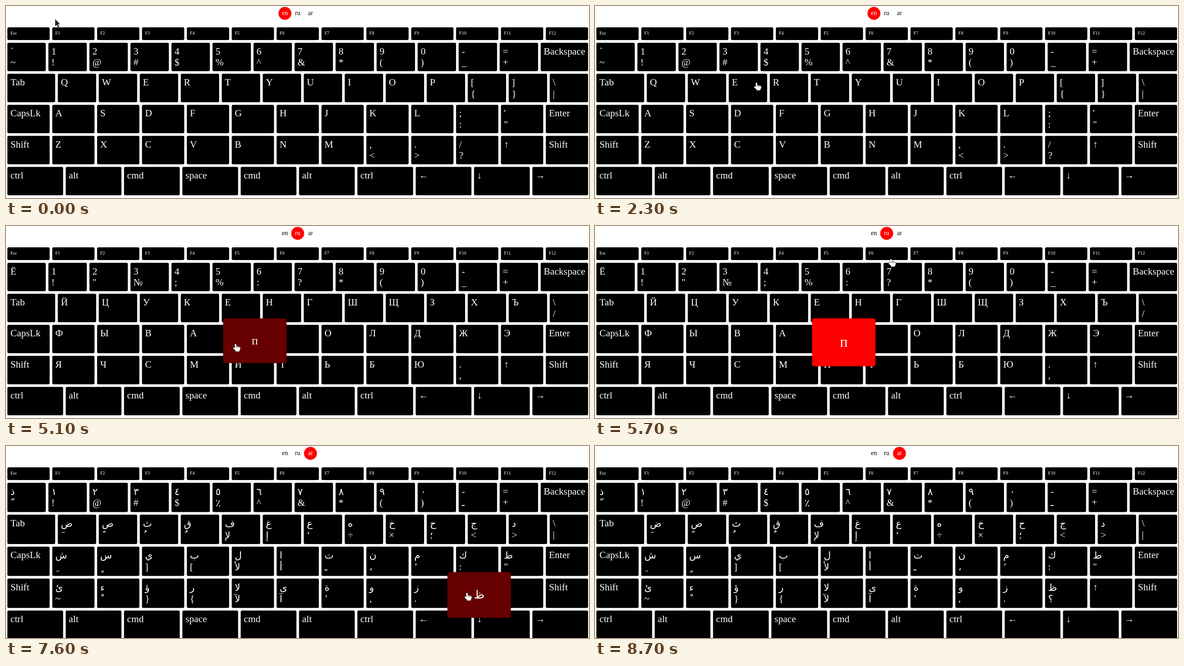
Recreate the animation shown at these times as an HTML page with a canvas. Size 1280 by 423 pixels, loop 9.4 s.

```html
<!DOCTYPE html>
<html lang="en">
<head>
<meta charset="utf-8">
<title>Keyboard layouts</title>
<style>
html, body { margin: 0; width: 100%; height: 100%; overflow: hidden; background: #fff; }
canvas { display: block; }
</style>
</head>
<body>
<canvas id="stage" width="1280" height="423"></canvas>
<script>
const ctx = document.getElementById('stage').getContext('2d');
const LOOP = 9400, STEP = 100;
const FONT = '"Liberation Serif", "DejaVu Sans", serif';
const SIZE = 21.3, PAD = 6.7, GAP = 5.7, LEFT = 3, WIDTH = 1275;
const ARABIC = /[\u0600-\u06ff]/;
const LANGS = ['en', 'ru', 'ar'];

// Keys are separated by spaces, the two lines of a key by ¦
const fnRow = 'Esc F1 F2 F3 F4 F5 F6 F7 F8 F9 F10 F11 F12';
const lastRow = 'ctrl alt cmd space cmd alt ctrl ← ↓ →';
const layouts = [
  [
    '`¦~ 1¦! 2¦@ 3¦# 4¦$ 5¦% 6¦^ 7¦& 8¦* 9¦( 0¦) -¦_ =¦+ Backspace',
    'Tab Q W E R T Y U I O P [¦{ ]¦} \\¦|',
    'CapsLk A S D F G H J K L ;¦: \'¦" Enter',
    'Shift Z X C V B N M ,¦< .¦> /¦? ↑ Shift'
  ], [
    'Ё 1¦! 2¦" 3¦№ 4¦; 5¦% 6¦: 7¦? 8¦* 9¦( 0¦) -¦_ =¦+ Backspace',
    'Tab Й Ц У К Е Н Г Ш Щ З Х Ъ \\¦/',
    'CapsLk Ф Ы В А П Р О Л Д Ж Э Enter',
    'Shift Я Ч С М И Т Ь Б Ю .¦, ↑ Shift'
  ], [
    '\u0630¦\u0651 \u0661¦! \u0662¦@ \u0663¦# \u0664¦$ \u0665¦\u066a \u0666¦^ \u0667¦& \u0668¦* \u0669¦( \u0660¦) -¦\u0640 =¦+ Backspace',
    'Tab \u0636¦\u064e \u0635¦\u064b \u062b¦\u064f \u0642¦\u064c \u0641¦\u0644\u0625 \u063a¦\u0625 \u0639¦‘ \u0647¦÷ \u062e¦× \u062d¦\u061b \u062c¦< \u062f¦> \\¦|',
    'CapsLk \u0634¦\u0650 \u0633¦\u064d \u064a¦] \u0628¦[ \u0644¦\u0644\u0623 \u0627¦\u0623 \u062a¦\u0640 \u0646¦\u060c \u0645¦’ \u0643¦: \u0637¦" Enter',
    'Shift \u0626¦~ \u0621¦\u0652 \u0624¦} \u0631¦{ \u0644\u0627¦\u0644\u0622 \u0649¦\u0622 \u0629¦’ \u0648¦, \u0632¦. \u0638¦\u061f ↑ Shift'
  ]
].map(rows => [fnRow, ...rows, lastRow].map(row => row.split(' ').map(key => key.split('¦'))));

const presses = [
  { at: 1200, row: 3, col: 1, char: 'a' },
  { at: 4900, row: 3, col: 5, char: 'п' },
  { at: 7400, row: 4, col: 10, char: '\u0638' }
];

// Pointer moves, each eased from where the last one ended
const home = { x: 108, y: 29 };
const moves = [
  { from: 500, to: 900, x: 153, y: 255 },
  { from: 1200, to: 1600, x: 175, y: 253 },
  { from: 1800, to: 3000, x: 655, y: 28 },
  { from: 3100, to: 3500, x: 649, y: 18 },
  { from: 4100, to: 4700, x: 505, y: 259 },
  { from: 5200, to: 5900, x: 687, y: 26 },
  { from: 5900, to: 6200, x: 676, y: 13 },
  { from: 6600, to: 6700, x: 679, y: 34 },
  { from: 6800, to: 7100, x: 1013, y: 323 },
  { from: 7600, to: 8600, x: 111, y: 8 }
];
const POINTER_GONE = 8700;

const arrow = new Path2D('M0 0V15.5L3.6 12.2 6.2 18.2 8.8 17 6.2 11.3H10.8Z');
const hand = new Path2D('M-2.6 1.6Q-1 -.6 .6 1.6V6.4Q2.2 5 3.6 6.8 5.2 5.6 6.4 7.6 8.8 6.6 9.4 9.4V12.5L7.6 15V17.4H-1V15.6L-6.4 10.4Q-6 7.6 -3.8 9L-2.6 10.2Z');
const knuckles = new Path2D('M.6 6.4V9.5M3.6 6.8V9.6M6.4 7.6V10');

const clamp = v => Math.max(0, Math.min(1, v));
const mix = (a, b, k) => a + (b - a) * k;
const ease = k => k * k * (3 - 2 * k);

function pointer(t) {
  return moves.reduce((p, m) => {
    const k = ease(clamp((t - m.from) / (m.to - m.from)));
    return { x: mix(p.x, m.x, k), y: mix(p.y, m.y, k) };
  }, home);
}

function keyBox(lang, row, col, count) {
  // Backspace and Tab are wider; the other keys of their row share the rest
  const wideCol = row === 1 ? count - 1 : row === 2 ? 0 : -1;
  const wide = row === 1 ? 104.1 : 105;
  const pitch = wideCol < 0 ? (WIDTH + GAP) / count : (WIDTH - wide) / (count - 1);
  const w = col === wideCol ? wide : pitch - GAP;
  const x = LEFT + col * pitch + (wideCol === 0 && col ? wide + GAP - pitch : 0);
  if (!row) return { x, y: 47, w, h: 28 };
  const h = lang === 2 ? 64.6 : 62.6;
  return { x, y: 81 + (row - 1) * (h + 5.76), w, h };
}

function panel(x, y, w, h, fill, r) {
  ctx.fillStyle = fill;
  ctx.beginPath();
  ctx.roundRect(x, y, w, h, r);
  ctx.fill();
}

function text(s, x, y, size, fill, align = 'left') {
  ctx.font = `${size}px ${FONT}`;
  ctx.textAlign = align;
  ctx.fillStyle = fill;
  ctx.fillText(s, x, y);
}

function drawKey(box, lines, small) {
  panel(box.x, box.y, box.w, box.h, '#000', 3);
  if (small) return text(lines[0], box.x + PAD, 62.5, 10, '#fff');
  let top = box.y + PAD;
  for (const line of lines) {
    const extra = ARABIC.test(line) ? 1 : 0;
    text(line, box.x + PAD, top + 19 + extra, SIZE, '#fff');
    top += 24.5 + extra;
  }
}

// Pops up in 200 ms, warms up to red, then falls back in 200 ms
function drawPressed(box, char, t) {
  const up = clamp(t / 200), warm = clamp((t - 200) / 600), down = clamp((1000 - t) / 200);
  const size = up * down, glow = (0.4 * up + 0.6 * warm) * down;
  const left = box.x - size * 19;
  const right = box.x + box.w + size * 27.5;
  const top = box.y - size * 14.3;
  const bottom = box.y + box.h + size * (21.8 + 7 * warm);
  const font = SIZE * (1 + glow / 2);
  panel(left, top, right - left, bottom - top, `rgb(${Math.round(255 * glow)},0,0)`, 3 + 1.5 * size);
  text(char, (left + right) / 2, (top + bottom) / 2 + font * 0.32, font, '#fff', 'center');
}

const tabX = i => 612.4 + 28 * i;
const onTab = (p, i) => Math.hypot(p.x - tabX(i), p.y - 16) < 14.2;

function drawTabs(lang, p) {
  LANGS.forEach((name, i) => {
    const x = tabX(i), active = i === lang;
    ctx.globalAlpha = onTab(p, i) ? 0.7 : 1;
    if (active) panel(x - 14.2, 2, 28.4, 28.4, '#f00', 14.2);
    text(name, x, 20.4, 14, active ? '#fff' : '#000', 'center');
    ctx.globalAlpha = 1;
  });
}

function drawPointer(p) {
  const isHand = p.y > 46 || LANGS.some((_, i) => onTab(p, i));
  const shape = isHand ? hand : arrow;
  ctx.save();
  ctx.translate(p.x, p.y);
  ctx.lineJoin = 'round';
  ctx.lineWidth = isHand ? 1.2 : 1.4;
  ctx.strokeStyle = isHand ? '#000' : '#fff';
  ctx.fillStyle = isHand ? '#fff' : '#222';
  ctx.stroke(shape);
  ctx.fill(shape);
  if (isHand) {
    ctx.lineWidth = 0.8;
    ctx.stroke(knuckles);
  }
  ctx.restore();
}

function draw(t) {
  const lang = t < 3800 ? 0 : t < 6600 ? 1 : 2;
  const p = pointer(t);
  const press = presses.find(k => t >= k.at && t < k.at + 1000);
  ctx.fillStyle = '#fff';
  ctx.fillRect(0, 0, 1280, 423);
  drawTabs(lang, p);
  let raised = null;
  layouts[lang].forEach((keys, row) => keys.forEach((lines, col) => {
    const box = keyBox(lang, row, col, keys.length);
    if (press && press.row === row && press.col === col) raised = box;
    else drawKey(box, lines, !row);
  }));
  if (raised) drawPressed(raised, press.char, t - press.at);
  if (t < POINTER_GONE) drawPointer(p);
}

function tick() {
  draw(Math.floor(performance.now() % LOOP / STEP) * STEP);
  requestAnimationFrame(tick);
}
tick();
</script>
</body>
</html>
```
